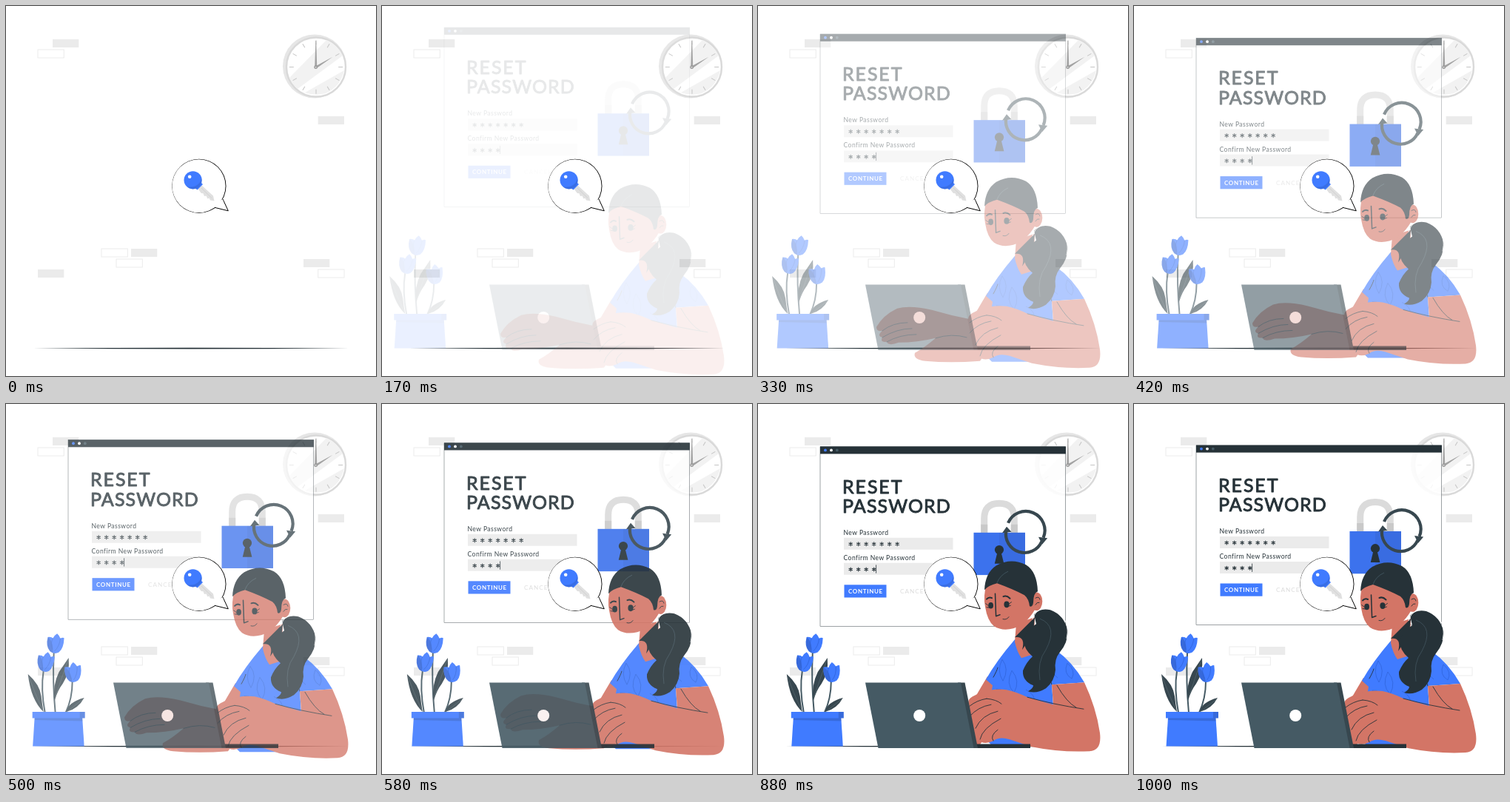
Animation of 500x500 px, one loop 1040 ms. Source, as an HTML page:

```html
<!DOCTYPE html>
<html lang="en">
<head>
<meta charset="utf-8">
<title>Reset password</title>
<style>
  html, body { margin: 0; width: 100%; height: 100%; overflow: hidden; background: #fff; }
  svg { display: block; width: 100vw; height: 100vh; }
  text { font-family: Lato, "Open Sans", sans-serif; fill: #263238; }
  .head { font-size: 25px; stroke: #263238; stroke-width: .9; stroke-linejoin: round; }
  .label { font-size: 8.6px; letter-spacing: .43px; }
  .blue { fill: #407bff; }
  .dark { fill: #263238; }
  .skin { fill: #d37566; }
  .ink { fill: none; stroke: #263238; stroke-width: .9; stroke-linecap: round; stroke-linejoin: round; }
  .shade { fill: #000; opacity: .14; }
  .leaf { fill: #37474f; }
  .stem { fill: none; stroke: #455a64; stroke-width: 2; }
  .fold { fill: none; stroke: #2f62d6; stroke-width: .7; }
</style>
</head>
<body>
<svg viewBox="0 0 500 500">
  <g id="bricks"></g>

  <g id="clock">
    <circle cx="417" cy="81.5" r="43" fill="#e6e6e6"/>
    <circle cx="419" cy="82.5" r="40" fill="#fff" stroke="#d9d9d9" stroke-width="2.4"/>
    <path d="M383 97 433 46Q448 52 455 67L394 112Q387 106 383 97ZM404 117 457 87Q452 109 432 118 418 122 404 117Z" fill="#f2f2f2"/>
    <g id="ticks" stroke="#c4c4c4" stroke-width="1"></g>
    <path d="M417.2 83 418.4 47 419.2 47 420.3 83ZM418 81.4 441.5 68.8 419.2 84.4Z" fill="#a3a3a3"/>
    <circle cx="418.6" cy="82.7" r="2.4" fill="#999"/>
    <circle cx="418.6" cy="82.7" r="1" fill="#dcdcdc"/>
  </g>

  <path class="dark" d="M37 462.4Q250 461.2 463 462.4 250 464.4 37 462.4Z"/>

  <g id="plant">
    <path class="stem" d="M72 336Q70 375 74 417M58 361Q54 385 60 417M97 375Q97 398 88 417"/>
    <path class="leaf" d="M37 365Q53 379 55 395 56 405 58 416 41 400 37 365ZM92 343Q94 363 84 378 77 387 73 401 70 380 79 362ZM113 397Q105 412 89 416 91 403 113 397Z"/>
    <path d="M38 368Q46 390 57 414M91 346Q82 372 74 396M111 399 91 415" fill="none" stroke="#5b6d75" stroke-width=".6"/>
    <g id="tulips"></g>
    <path class="blue" d="M46 424H110.5L113 462.5H43.5Z"/>
    <path class="shade" d="M46 424H110.5L110.8 428.5 45.7 427Z"/>
    <path class="blue" d="M43 416H114V424.5H43Z"/>
    <path class="shade" d="M107 416H114V424.5H107Z"/>
  </g>

  <g id="window">
    <rect x="84" y="56" width="331.7" height="242.5" fill="#fff" fill-opacity=".86" stroke="#263238" stroke-width=".45"/>
    <rect class="dark" x="84" y="55.6" width="332" height="10"/>
    <circle class="blue" cx="91" cy="60.6" r="1.9"/>
    <circle cx="99" cy="60.6" r="1.9" fill="#fff"/>
    <circle cx="106.8" cy="60.6" r="1.9" fill="#455a64"/>
    <text class="head" x="114" y="118.8" letter-spacing="1.9">RESET</text>
    <text class="head" x="114" y="145" letter-spacing="1.1">PASSWORD</text>
    <text class="label" x="115.5" y="175">New Password</text>
    <text class="label" x="115.5" y="209">Confirm New Password</text>
    <path d="M116 179H263.5V195H116ZM116 213H263.5V229H116Z" fill="#ebebeb"/>
    <g id="stars" class="ink" style="stroke-width:1.1"></g>
    <path class="ink" d="M159.6 216V226.5" style="stroke-width:.8"/>
    <rect class="blue" x="116.5" y="242.5" width="57" height="17.2"/>
    <text x="122" y="254" font-size="8" font-weight="700" letter-spacing=".65" style="fill:#fff">CONTINUE</text>
    <text x="192" y="254" font-size="8.2" letter-spacing="1" style="fill:#dbdbdb">CANCEL</text>

    <path d="M305.7 173V153Q305.7 132.5 326 132.5 346.3 132.5 346.3 153V173" fill="none" stroke="#dbdbdb" stroke-width="9"/>
    <path d="M301.2 161H310.2V173H301.2ZM341.8 161H350.8V173H341.8Z" fill="#c9c9c9"/>
    <rect class="blue" x="291.5" y="172" width="69.5" height="57.3"/>
    <path d="M291.5 172H361V229.3H291.5Z" opacity=".07"/>
    <path d="M326 172H361V229.3H326Z" opacity=".05"/>
    <circle class="dark" cx="326" cy="195.2" r="6.1"/>
    <path class="dark" d="M323.6 198H328.4L332.4 214H319.8Z"/>
    <g fill="none" stroke="#37474f" stroke-width="4.2">
      <path d="M338 159A25.3 25.3 0 0 1 385.6 179"/>
      <path d="M383.4 184A25.3 25.3 0 0 1 335.4 169"/>
    </g>
    <path d="M330 172.5 336 164 342.5 171ZM379 178 391.2 179.5 384 188Z" fill="#37474f"/>
  </g>

  <g id="bubble">
    <path d="M293 261 300.3 276.8 282 272.3" fill="#fff" stroke="#000" stroke-width="1"/>
    <circle cx="260.9" cy="243.3" r="36.6"/>
    <circle cx="260.55" cy="243.2" r="36.05" fill="#fff"/>
    <path d="M281.5 271.5 292.3 261 294 264.5 285 272.3Z" fill="#fff"/>
    <path d="M259 246.5 263.5 241.5 280 256.5 281.5 263.5 276 262.5 274.5 259.5 272.5 260.5 270.5 256.5 268 257 266.5 253.2 263.8 253Z" fill="#e0e0e0"/>
    <path d="M264 246 278.5 260" stroke="#cfcfcf" stroke-width=".8"/>
    <path class="blue" d="M256 246.5 263.5 238.5 266 241 258.5 248.5Z"/>
    <circle class="blue" cx="252.6" cy="235.3" r="12.1"/>
    <path class="shade" d="M264.4 232.5A12.1 12.1 0 0 1 244 244Q260 247 264.4 232.5Z" style="opacity:.1"/>
    <circle cx="248.2" cy="230.8" r="2.3" fill="#fff"/>
  </g>

  <g id="girl">
    <!-- far arm and hand -->
    <path class="skin" d="M310 370Q298 390 289 406 262 401 235 393 205 386 188 391 169 400 160 416 160 423 168 421 160 428 168 430 164 437 174 436 176 442 190 437 215 437 240 431 225 444 212 451 209 460 226 462 260 465 300 462L330 420 325 372Z"/>
    <path class="ink" d="M168 421Q182 410 202 410M168 430Q188 418 208 418M174 436Q192 426 214 426M240 431Q262 424 282 430"/>
    <!-- shirt -->
    <path class="blue" d="M347 320Q322 349 308 374L317 382 305 452 316 463H372L399 410 397 381 441 378Q425 350 402 334L368 326Z"/>
    <path class="fold" d="M330 347Q322 362 331 376 340 360 330 347ZM343 362Q334 380 346 392 355 376 343 362ZM418 352Q412 366 424 373 430 362 418 352ZM322 387Q334 386 340 401 327 403 322 387ZM398 350Q394 364 405 372M362 388Q375 394 374 407"/>
    <path class="ink" d="M318 371Q323 362 324 358M388 350Q393 367 397 381"/>
    <!-- neck -->
    <path class="skin" d="M349 298 347 323Q350 337 356 345L372 340 374 290Z"/>
    <path class="dark" d="M347 317 374 290 372 310Q364 324 357 334 362 315 347 317Z"/>
    <!-- face -->
    <ellipse class="skin" cx="376.5" cy="268.5" rx="7.8" ry="12.3"/>
    <path class="skin" d="M309 243Q304 262 307 276 310 295 319 302 330 309 345 305 362 300 374 280L366 245 330 230Z"/>
    <path class="dark" d="M306 253Q307 230 322 220 342 209 362 219 377 228 378 255 372 257 372 270 371 277 367 275 366 265 360 260 345 252 323 244 311 247 306 253Z"/>
    <path d="M323 243.5Q327 233 338 228" fill="none" stroke="#455a64" stroke-width=".8"/>
    <path class="ink" d="M320.5 258 321.6 288.5 327 286.5" style="stroke-width:1.5"/>
    <path class="ink" d="M309 265.5Q312 262 316 264M331.5 262Q336 260 340.5 264.5" style="stroke-width:2"/>
    <ellipse class="dark" cx="314.6" cy="274" rx="3.4" ry="4.3"/>
    <ellipse class="dark" cx="336" cy="272.6" rx="3.6" ry="4.4"/>
    <path class="ink" d="M311 274 307.6 271.5M312 277 309 276.5M339 272 342.5 269.5M339 275 341.5 274M331 292.5Q336 294 339 289.5M375 264Q380 261 381 266M375 273Q377 269 380 270"/>
    <!-- ponytail -->
    <path class="dark" d="M373 286Q381 277 395 280 414 287 418.5 308 419 324 408 337 400 347 402 361 401 376 389 386 376 394 365 390 372 386 372 382 357 376 358 362 363 350 371 343 359 333 359 320 363 307 376 299Z"/>
    <path d="M371 293Q374 283 381 280M413 291Q421 302 417 319" fill="none" stroke="#fff" stroke-width=".9"/>
    <path d="M381 292Q406 302 389 334 377 350 381 375" fill="none" stroke="#455a64" stroke-width=".7"/>
    <!-- near arm -->
    <path class="skin" d="M397 381 441 378Q457 412 462 446 465 470 448 471 410 473 370 465L340 455Q326 451 318 457 306 463 297 456 290 448 294 440 284 434 286 424 281 418 286 410 281 402 290 397L302 391Q320 386 336 388 350 391 364 398L399 408Z"/>
    <path class="ink" d="M286 410Q296 402 309 400M286 424Q297 411 315 408M294 440Q302 422 324 417M300 455Q303 440 328 427M309 400Q322 401 329 407M364 398Q400 408 440 414M404 382Q417 405 430 412M318 457Q313 450 324 442"/>
  </g>

  <g id="laptop">
    <path d="M235 459.5H368V465H235Z" fill="#263238"/>
    <path d="M270 376.5H279.5L297 465H280Z" fill="#37474f"/>
    <path d="M145 376.5H274L291.5 465H162.5Z" fill="#455a64"/>
    <circle cx="218.2" cy="421" r="8" fill="#fff"/>
  </g>
</svg>
<script>
const $ = id => document.getElementById(id);
const fill = (id, items, draw) => { $(id).innerHTML = items.map(draw).join(""); };

// x, y, outlined
fill("bricks", [[63, 45, 0], [43, 59, 1], [421.7, 149, 0], [129, 328, 1], [169, 328, 0],
  [149, 342, 1], [43, 356, 0], [402, 342, 0], [421.7, 356, 1]],
  ([x, y, outlined]) => `<rect x="${x}" y="${y}" width="35.3" height="11" ` +
    (outlined ? 'fill="#fff" stroke="#ececec" stroke-width="1"/>' : 'fill="#ebebeb"/>'));

fill("ticks", [...Array(12).keys()], i =>
  `<path d="M419 46.3V52.3" transform="rotate(${i * 30} 419 82.5)"/>`);

const row = (n, y) => Array.from({ length: n }, (_, i) => [125.2 + i * 10.5, y]);
fill("stars", [...row(7, 187.5), ...row(4, 221.7)], ([x, y]) =>
  `<path transform="translate(${x} ${y})" d="M0-2.5V2.5M-2.2-1.25 2.2 1.25M-2.2 1.25 2.2-1.25"/>`);

// x, y, tilt
fill("tulips", [[74, 324, 6], [61, 349, 8], [98, 363, -4]], ([x, y, tilt]) =>
  `<g transform="translate(${x} ${y}) rotate(${tilt})">
    <path class="blue" d="M-11-8Q-6-9-4-7-2-12 1-14 4-12 6-8 9-10 11-9 12 5 6 11 0 15-6 11-13 4-11-8Z"/>
    <path class="shade" d="M-11-8Q-3-4-2 13-13 9-11-8Z"/>
    <path class="fold" d="M-4-7Q-7 0-3 8M6-8Q6 3 0 10"/>
  </g>`);

const LOOP = 1040, FRAME = 1000 / 24, SHIFT = 30;

const bezier = (a, b, s) => 3 * (1 - s) ** 2 * s * a + 3 * (1 - s) * s * s * b + s ** 3;

// cubic-bezier(.36, -.01, .5, 1.38), overshooting near the end
function ease(x) {
  if (x <= 0 || x >= 1) return x <= 0 ? 0 : 1;
  let lo = 0, hi = 1;
  for (let i = 0; i < 24; i++) {
    const mid = (lo + hi) / 2;
    if (bezier(.36, .5, mid) < x) lo = mid; else hi = mid;
  }
  return bezier(-.01, 1.38, lo);
}

// entry direction of each part
const parts = { window: [0, -1], plant: [-1, 0], girl: [0, 1], laptop: [0, 0] };

function render(ms) {
  const step = Math.min(24, Math.floor((ms + 5) / FRAME));
  const p = step < 2 ? 0 : ease((step * FRAME + 6) / 1000);
  const away = SHIFT * (1 - p);
  for (const [id, [dx, dy]] of Object.entries(parts)) {
    $(id).setAttribute("transform", `translate(${dx * away} ${dy * away})`);
    $(id).setAttribute("opacity", Math.max(0, Math.min(1, p)));
  }
}

const start = performance.now();
function tick() {
  render((performance.now() - start) % LOOP);
  requestAnimationFrame(tick);
}
tick();
</script>
</body>
</html>
```
